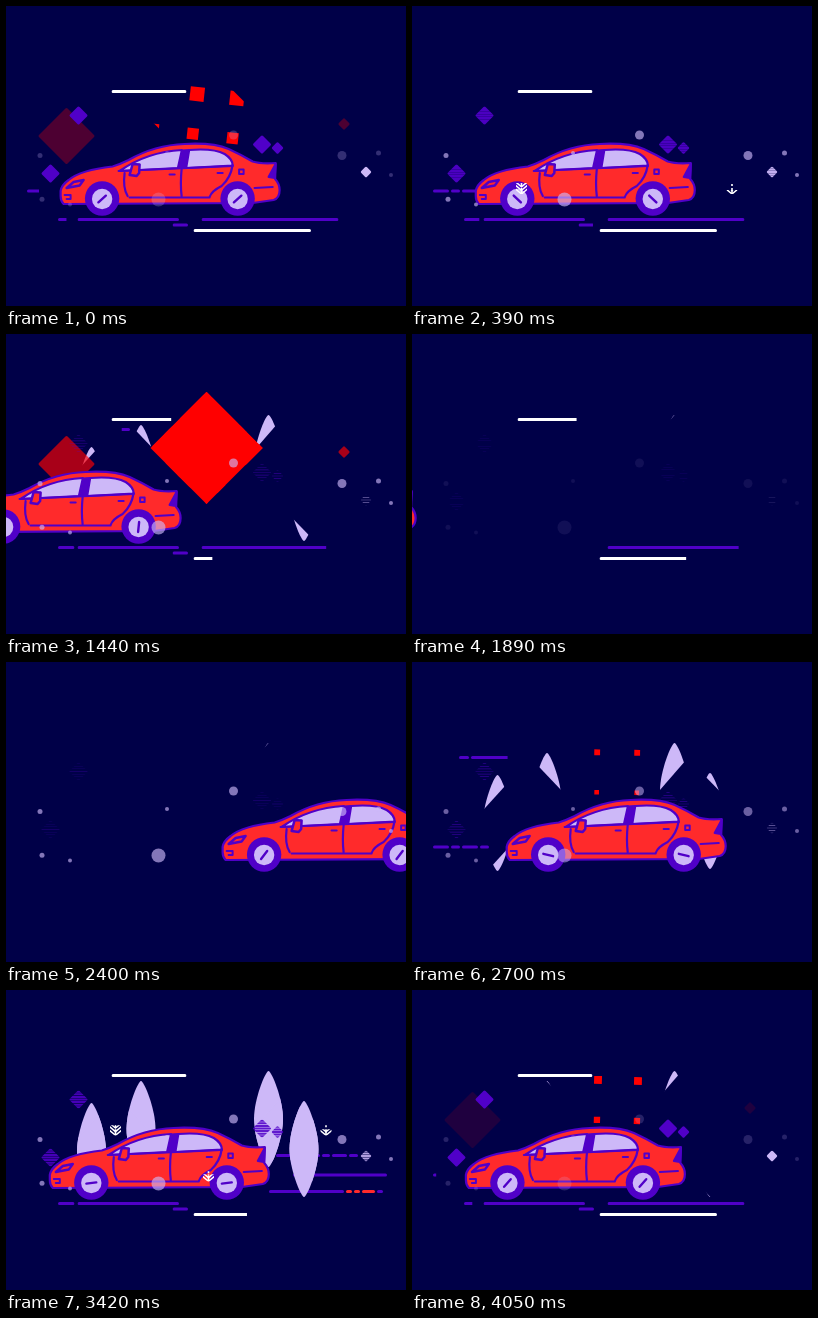
These frames come from a looping animation (400x300 px, 4.08 s). An HTML page with a canvas:

```html
<!DOCTYPE html>
<html lang="en">
<head>
<meta charset="utf-8">
<title>Car ride</title>
<style>
html, body { margin: 0; width: 100%; height: 100%; overflow: hidden; background: #000048; }
canvas { display: block; }
</style>
</head>
<body>
<canvas id="stage" width="400" height="300"></canvas>
<script>
const ctx = document.getElementById('stage').getContext('2d');
const LOOP = 4080, TURN = 2 * Math.PI;
const NIGHT = '#000048', PURPLE = '#5000c8', LILAC = '#cdb8f8', RED = '#ff2a2b', PURE = '#f00', WHITE = '#fff';

const clamp = (v, lo, hi) => Math.min(hi, Math.max(lo, v));
const ramp = (t, a, b) => clamp((t - a) / (b - a), 0, 1);
const smooth = (t, a, b) => { const u = ramp(t, a, b); return u * u * (3 - 2 * u); };
const since = (t, start) => (t - start + LOOP) % LOOP;

function layer(draw) {
  ctx.save();
  draw();
  ctx.restore();
}

function clipBox(x, y, w, h) {
  ctx.beginPath();
  ctx.rect(x, y, w, h);
  ctx.clip();
}

function clipPoly(...points) {
  ctx.beginPath();
  for (const [x, y] of points) ctx.lineTo(x, y);
  ctx.clip();
}

function disc(x, y, r, color) {
  ctx.fillStyle = color;
  ctx.beginPath();
  ctx.arc(x, y, r, 0, TURN);
  ctx.fill();
}

function diamond(x, y, r, color) {
  const h = r / Math.SQRT2 + .4;
  layer(() => {
    ctx.translate(x, y);
    ctx.rotate(TURN / 8);
    ctx.fillStyle = color;
    ctx.beginPath();
    ctx.roundRect(-h, -h, 2 * h, 2 * h, 1.5);
    ctx.fill();
  });
}

function dash(y, a, b, color) {
  ctx.fillStyle = color;
  ctx.beginPath();
  ctx.roundRect(a, y - 1.5, b - a, 3, 1.5);
  ctx.fill();
}

// Dashes laid end to end; a gust runs in from the left, holds, and runs out
function wind(t, y, x, widths, starts, hold, reds = []) {
  const length = widths.reduce((sum, w) => sum + w + 2, 0);
  for (const start of starts) {
    const p = since(t, start);
    const head = length * ramp(p, 0, 200), tail = length * ramp(p, hold, hold + 300);
    if (head <= tail) continue;
    layer(() => {
      clipBox(x + tail, y - 3, head - tail, 6);
      let a = x;
      widths.forEach((w, i) => {
        dash(y, a, a + w, reds.includes(i) ? RED : PURPLE);
        a += w + 2;
      });
    });
  }
}

// A line that grows in, shrinks out, and may pull back around one moment
function road(t, y, a, b, { from, to, dip = 0, depth = 0, color = PURPLE }) {
  const shown = t > from ? smooth(t, from, from + 300) : 1 - smooth(t, to, to + 300);
  const gap = Math.min(since(t, dip), since(dip, t));
  const pull = depth * Math.cos(TURN / 4 * Math.min(1, gap / 600)) ** 2;
  const reach = (b - a) * (shown - pull);
  if (reach <= 0) return;
  layer(() => {
    clipBox(a, y - 3, reach, 6);
    dash(y, a, b, color);
  });
}

function drawLines(t) {
  wind(t, 95.5, 47, [10, 38, 10, 13], [640, 2578], 540, [2]);
  wind(t, 185, 21, [16, 9, 16, 9], [4040, 2490], 754);
  const gusts = [560, 3200];
  wind(t, 165.5, 270, [44, 8, 15, 9], gusts, 300);
  wind(t, 185, 287, [10, 82], gusts, 300);
  wind(t, 201.5, 263, [75, 6, 6, 13, 6], gusts, 300, [1, 2, 3]);

  road(t, 213.5, 52, 68.5, { from: 2850, to: 1560, dip: 4020, depth: .5 });
  road(t, 213.5, 71.5, 173, { from: 2800, to: 1540 });
  road(t, 219, 166.5, 182, { from: 2850, to: 1560, dip: 840, depth: .45 });
  road(t, 213.5, 195.5, 332.5, { from: 3600, to: 1860, dip: 1440, depth: .09 });
  road(t, 85.5, 105.5, 180.5, { from: 2950, to: 1860, dip: 1650, depth: .28, color: WHITE });
  road(t, 224.5, 187.5, 305, { from: 3280, to: 1860, dip: 1500, depth: .86, color: WHITE });
}

// The big diamond is built from a turning grid of growing squares
function drawReds(t) {
  for (const start of [0, 1360, 2745, LOOP]) {
    const p = t - start;
    if (p < -65 || p > 260) continue;

    layer(() => {
      ctx.globalAlpha = .66 * ramp(p, -42, 80) ** .75 * (1 - ramp(p, 140, 260));
      diamond(60.5, 130, 28, PURE);
      diamond(338, 118, 5.6, PURE);
    });

    const size = Math.min(75, 14 * Math.exp(p / 50)) * (1 - ramp(p, 160, 260));
    layer(() => {
      clipPoly([200.5, 58], [256.5, 114], [200.5, 170], [144.5, 114]);
      ctx.translate(211, 151);
      ctx.rotate(Math.min(.2, .105 * Math.exp(p / 21)));
      ctx.fillStyle = PURE;
      for (let row = -1; row < 3; row++) {
        const s = size * (1 - .2 * row);
        for (let col = -2; col < 4; col++) {
          ctx.fillRect(40 * col - 26.6 - s / 2, 40 * row - 60.4 - s / 2, s, s);
        }
      }
    });
  }
}

// Leaves are uncovered by slanted wipes from both tips
function drawLeaf(x, y, slope, top, bottom) {
  const end = y + 96, w = 20, lean = slope * w;
  const wipe = (edge, cut) => layer(() => {
    clipPoly([x - w, edge], [x + w, edge], [x + w, cut + lean], [x - w, cut - lean]);
    ctx.fillStyle = LILAC;
    ctx.beginPath();
    ctx.moveTo(x, y);
    for (const side of [1, -1]) {
      const [a, b] = side > 0 ? [y, end] : [end, y];
      const near = 3 * side, far = 14.5 * side, bend = (b - a) * .29;
      ctx.bezierCurveTo(x + near, a, x + far, a + bend, x + far, y + 48);
      ctx.bezierCurveTo(x + far, b - bend, x + near, b, x, b);
    }
    ctx.fill();
  });
  if (top > 0) wipe(y - 30, y + top);
  if (bottom > 0) wipe(end + 30, end - bottom);
}

function drawLeaves(t) {
  const grow = t < 2000
    ? 28 * Math.sin(Math.PI * ramp(t, 1330, 1800))
    : 95 * smooth(t, 2400, 3200) * (1 - ramp(t, 3700, 4085));
  drawLeaf(85.5, 113, -1.1, grow - 11, grow - 19);
  drawLeaf(135, 91, 1.05, grow - 8, grow - 40);
  drawLeaf(262.5, 81, -1.15, grow, grow - 40);
  drawLeaf(298, 111, 1.03, grow - 22, grow - 8);
}

// Diamonds cut into stripes that thin out mid-loop
function drawBlinds(t) {
  const cover = .53 + .47 * Math.cos(TURN * t / LOOP), pitch = 2.6;
  const blind = (x, y, r, color) => layer(() => {
    ctx.globalAlpha = .4 + .6 * cover;
    if (cover < .97) {
      ctx.beginPath();
      for (let k = -4; k < 5; k++) ctx.rect(x - 12, y + pitch * (k - cover / 2), 24, pitch * cover);
      ctx.clip();
    }
    diamond(x, y, r, color);
  });
  blind(72.5, 109.5, 9, PURPLE);
  blind(44.5, 167.5, 9, PURPLE);
  blind(256, 138.5, 9, PURPLE);
  blind(271.5, 142, 5.7, PURPLE);
  blind(360, 166, 5.2, LILAC);
}

// Drift about the middle, speed out to the left, brake in from the right
function carX(t) {
  if (t < 1000 || t > 3300) return 3.25 - 13.75 * Math.cos(Math.PI * since(t, 3300) / 1780);
  if (t < 1440) return 17 - 115 * ((t - 1000) / 440) ** 1.5;
  if (t < 2142) return -98 - .38 * (t - 1440);
  return -10.5 + 370 * ((3300 - t) / 1158) ** 3;
}

function shape(d, fill, width = 2.2) {
  const path = new Path2D(d);
  if (fill) {
    ctx.fillStyle = fill;
    ctx.fill(path);
  }
  ctx.lineWidth = width;
  ctx.stroke(path);
}

function drawCar(t) {
  layer(() => {
    ctx.translate(carX(t), 0);
    ctx.strokeStyle = PURPLE;
    ctx.lineCap = ctx.lineJoin = 'round';

    // Body and spoiler
    shape('M57 198 Q54 195 54 190 V185 Q55 179 62 174 Q74 164 106 160.500 Q114 158 122 154 '
      + 'Q148 139 178 138 Q207 136.500 222 143 Q235 149 246 155.500 Q254 158 269 157 '
      + 'L268.500 173 Q273 178 273 184 Q273 192 267 194 L246 197 Z', RED);
    shape('M262 171 L269 158 L268 172 Z', PURPLE);

    // Windows, pillar and mirror
    shape('M176 144 L183 143.500 L179 162 L172 162 Z', PURPLE, 1);
    shape('M113 165 Q140 146 175.300 144 L171.300 162 L133 164 Z', LILAC);
    shape('M182.500 144 Q207 142 218 148 Q226 153 226 159.500 L179.500 162 Z', LILAC);
    shape('M112 165 L170 162.500 L226 160');
    shape('M126 158 L133 158.500 L132.500 167 L130 170 L123 169 Z', RED, 2.5);

    // Doors, handles, cap and lamps
    shape('M118 167 Q116 182 121 190 M123 191.500 H203 '
      + 'M175 163 Q173.500 178 175 190 M226 159 Q224 172 215 180 Q205 185 203 191');
    shape('M163 168.500 H168 M211 167 H216 M248 182 L266 181');
    shape('M232.500 163.500 H237 V168 H232.500 Z', null, 2);
    shape('M60 182 L67 176 L77 174 L73 179.500 Z', RED, 2.4);
    shape('M58 189 H64 V193 H60', null, 2);

    for (const x of [95.5, 231]) {
      disc(x, 192.5, 17.2, PURPLE);
      disc(x, 193, 10.2, LILAC);
      layer(() => {
        ctx.translate(x, 193);
        ctx.rotate(TURN * (2.5 * t / LOOP - .117));
        shape('M-5 0 H5', null, 2.4);
      });
    }
  });
}

// A rising sprout: a stem over herringbone leaves seen through a short window
function sprout(x, y, height) {
  layer(() => {
    ctx.translate(x, y);
    ctx.strokeStyle = WHITE;
    shape('M0 -5 V-3 M0 -1 V5', null, 1.6);
    clipBox(-5.5, 5 - height, 11, height);
    for (let foot = 5; foot > -10; foot -= 3.6) shape(`M-6 ${foot - 5} L0 ${foot} L6 ${foot - 5}`, null, 1.5);
  });
}

function drawSprouts(t) {
  const q = (t < 1360 ? t : t - 2720) - 650;
  if (Math.abs(q) > 360) return;
  const y = 144 - .07 * q - 1.2e-6 * q ** 3;
  const height = dir => clamp(8 + .03 * dir * (q - 120), 4, 11);
  sprout(109.5, y, height(-1));
  sprout(320, y, height(1));
  if (q > -50 && q < 280) sprout(202.5, 185 + .025 * q, height(1) + 1);
}

function drawDots(t) {
  const wave = Math.sin(Math.PI * (t / (LOOP / 4) + .13)) ** 2;
  const dots = [[34, 149.5, 2.5], [36, 193.3, 2.5], [64, 198.5, 2], [152.5, 193.5, 7], [161, 147, 2],
    [227.5, 129, 4.5], [336, 149.5, 4.5], [372.5, 147, 2.5], [385, 169, 2]];
  layer(() => {
    ctx.globalAlpha = .08 + .56 * Math.min(1, 1.9 * wave);
    for (const dot of dots) disc(...dot, LILAC);
  });
}

function frame() {
  const t = performance.now() % LOOP;
  ctx.fillStyle = NIGHT;
  ctx.fillRect(0, 0, 400, 300);
  for (const draw of [drawLines, drawLeaves, drawReds, drawBlinds, drawCar, drawSprouts, drawDots]) draw(t);
  requestAnimationFrame(frame);
}
frame();
</script>
</body>
</html>
```
